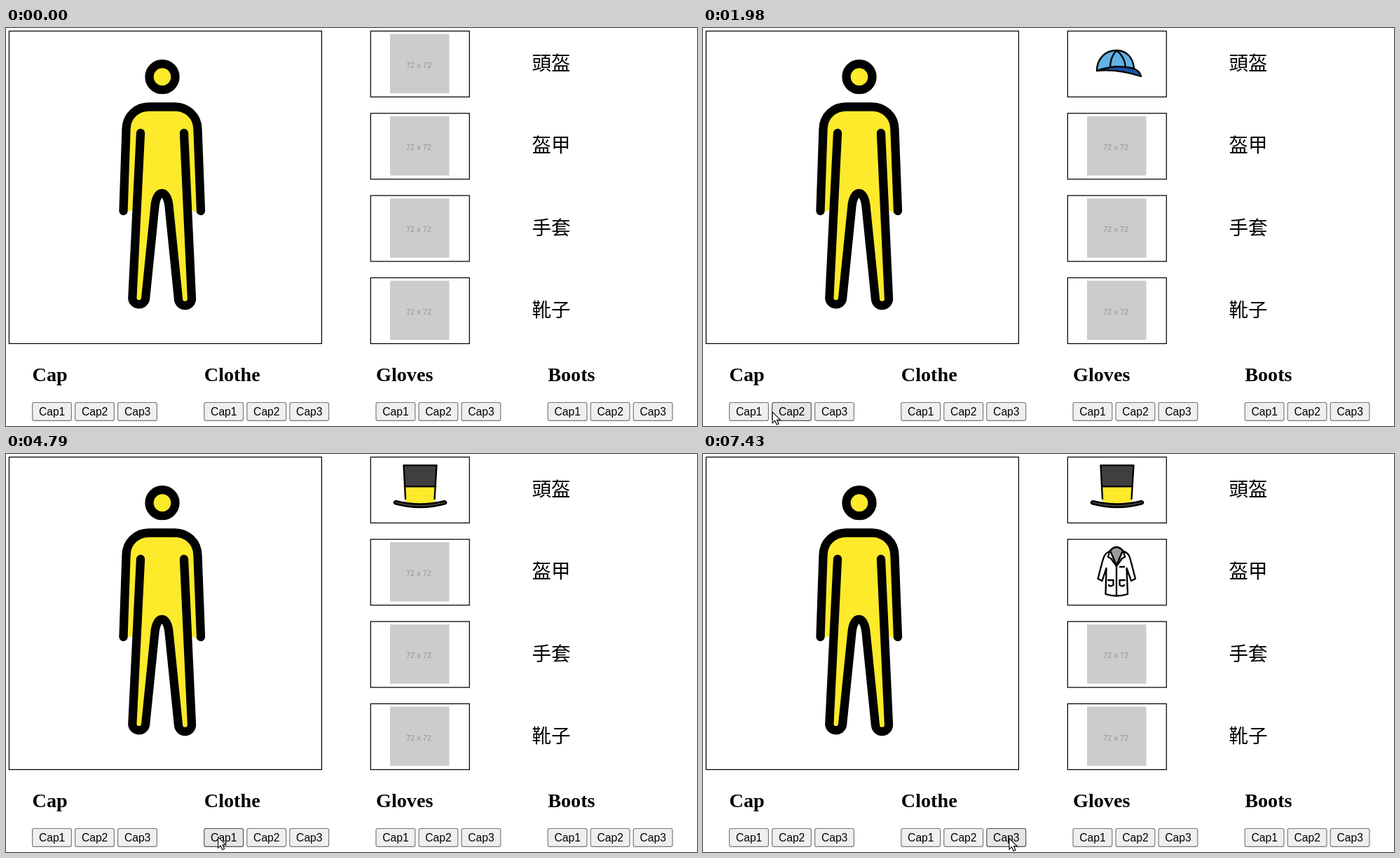
Write an HTML page that moves like this. It is 986 px wide and 568 px high and loops after 8 s.

```html
<!DOCTYPE html>
<html lang="zh-Hant">
<head>
<meta charset="utf-8">
<title>Dress up</title>
<style>
html, body { margin: 0; width: 100%; height: 100%; overflow: hidden; background: #fff; }
svg { display: block; }
.frame { fill: #fff; stroke: #000; stroke-width: 1.25; }
.man { stroke: #000; stroke-width: 12.3; stroke-linecap: round; stroke-linejoin: round; fill: none; }
.item { stroke: #000; stroke-width: 2.35; stroke-linecap: round; stroke-linejoin: round; fill: none; }
.hint { font: 11px "Liberation Sans", Arial, sans-serif; fill: #969696; text-anchor: middle; }
.label { font: 300 27.5px "Noto Sans CJK TC", "Noto Sans CJK", sans-serif; }
.title { font: bold 28.2px "Liberation Serif", Times, serif; }
.btn text { font: 15.67px "Liberation Sans", Arial, sans-serif; text-anchor: middle; }
.btn rect { fill: #efefef; stroke: #767676; stroke-width: 1.15; }
.btn.hover rect { fill: #e5e5e5; stroke: #4f4f4f; }
.btn.active rect { fill: #f5f5f5; stroke: #8d8d8d; }
</style>
</head>
<body>
<svg width="986" height="568" viewBox="0 0 986 568">
  <rect class="frame" x="4.4" y="4.4" width="446" height="446"/>
  <path fill="#fcea2b" d="M170 263L171.5 145C171.5 125 187 112.5 204 112.5H241C258 112.5 273.5 125 273.5 145L277 267L259 256L265 386A9.5 9.5 0 0 1 246 387L232.5 254C230 230 215 230 212.5 254L199 387A9.5 9.5 0 0 1 180.3 386L186 258Z"/>
  <g class="man">
    <circle cx="223" cy="69.7" r="18.5" fill="#fcea2b"/>
    <path d="M167.5 261L171.5 145C171.5 125 187 112.5 204 112.5H241C258 112.5 273.5 125 273.5 145L278 261"/>
    <path d="M192 150L180.3 386A9.5 9.5 0 0 0 199 387L212.5 254C215 230 230 230 232.5 254L246 387A9.5 9.5 0 0 0 265 386L254 150"/>
  </g>
  <g id="ui"></g>

  <g class="item" id="cap">
    <path fill="#61b2e4" d="M562 61C562 44 574 32 590 32C604 32 614 42 615 58Q590 52 562 61Z"/>
    <path fill="#1e50a0" d="M562 61Q590 51 615 58Q624 62 625 69Q592 58 562 61Z"/>
    <path d="M590 32Q581 42 581 56M590 32Q602 41 603 56"/>
  </g>
  <g class="item" id="hat">
    <ellipse cx="590.3" cy="55.5" rx="31.5" ry="7.5" fill="#f1b31c"/>
    <path fill="#f1b31c" stroke="none" d="M575 53C575 39 581 33 590.5 33S606 39 606 53Q590 58 575 53Z"/>
    <path fill="#a57939" stroke="none" d="M594 33Q606 36 606 52L599 54Q601 42 594 33Z"/>
    <path fill="#781e32" d="M575 50Q590 55 606 50V54Q590 58 575 54Z"/>
    <path d="M575 53C575 39 581 33 590.5 33S606 39 606 53"/>
    <path fill="#ea5a47" stroke-width="1.8" d="M601 52L593 49V56ZL610 48.5V56Z"/>
  </g>
  <g class="item" id="tophat">
    <path fill="#fcea2b" stroke="none" d="M569 46H613L612 68Q591 74 570 68Z"/>
    <path fill="#3f3f3f" stroke="none" d="M567 16H615L613 46H569Z"/>
    <path d="M570 64L567.5 16.2H614.5L611.5 64M569 46.3H613"/>
    <path fill="#4b4238" d="M556 67Q591 76 626 67Q630 69 627 71Q609 76 591 76T555 71Q552 69 556 67Z"/>
  </g>
  <g class="item" id="shirt">
    <path fill="#61b2e4" d="M579 140L557.5 151L562 162L572.5 158V191.2H608.5V158L619 162L623.5 151L602 140Q590 129 579 140Z"/>
    <path d="M572.5 158V149M608.5 158V149"/>
    <path fill="#92d3f5" d="M579 140Q590 129 602 140L597 152L590.3 144L584 152ZM581 140Q590 137 599 140"/>
    <path d="M590.3 150v.1M590.3 154.3v.1M590.3 158.6v.1"/>
  </g>
  <g class="item" id="coat">
    <path fill="#fff" d="M580 139C574 141 572 146 570 153L563.5 178L569.5 181L575.5 163L574.5 200Q590 205 606 200L604.5 163L611 181L617 178L610.5 153C609 146 607 141 600 139Q590 127 580 139Z"/>
    <path fill="#9b9b9a" d="M581 138Q590 128 599 138L590 159Z"/>
    <path d="M580 139L578 147L582 149L590 160L598 149L602 147L600 139M590 160V202M595 161H601M578 180H585.5V187Q581 190 579 187M602 180H594.5V187Q599 190 601 187"/>
  </g>

  <circle id="spot" r="14" fill="#faf028" fill-opacity=".65"/>
  <path id="cursor" d="M0 0V15.6L3.6 12.2L6.2 18L9 16.8L6.5 11.2H11.3Z" fill="#fff" stroke="#000" stroke-width="1.1"/>
</svg>
<script>
const $ = id => document.getElementById(id);
const LOOP = 8000;

// Slots, labels and button groups
let html = '';
['頭盔', '盔甲', '手套', '靴子'].forEach((label, i) => {
  const y = i * 117.35;
  html += `<rect class="frame" x="520.3" y="${4.4 + y}" width="141" height="94"/>
    <g id="blank${i}"><rect x="548" y="${8.6 + y}" width="84.5" height="84.5" fill="#ccc"/>
    <text class="hint" x="589" y="${56.5 + y}">72 x 72</text></g>
    <text class="label" x="750.5" y="${60 + y}">${label}</text>`;
});
const buttons = [];
['Cap', 'Clothe', 'Gloves', 'Boots'].forEach((title, i) => {
  const left = 37.6 + i * 245.2;
  html += `<text class="title" x="${left}" y="504">${title}</text>`;
  for (let n = 0; n < 3; n++) {
    const x = left + n * 61;
    buttons.push({ x });
    html += `<g class="btn"><rect x="${x}" y="534.5" width="55.8" height="25.8" rx="2.5"/>
      <text x="${x + 28}" y="552.5">Cap${n + 1}</text></g>`;
  }
});
$('ui').innerHTML = html;
document.querySelectorAll('.btn').forEach((el, i) => buttons[i].el = el);

// Pointer moves: first change, last change, steps, end point, rise on the way
const moves = [
  [330, 830, 7, 61, 549, 0],
  [1710, 2170, 6, 137, 548, 0],
  [3090, 3640, 7, 187, 549, 0],
  [4520, 4880, 5, 316, 547, 0],
  [5800, 6340, 7, 381, 549, 33],
  [6880, 7160, 4, 391, 548, 0],
  [7340, 7430, 2, 437, 549, 0]
];
// Clicks: highlight on, highlight off, item put on, its slot
const clicks = [
  [1360, 1440, 'cap', 0],
  [2530, 2620, 'hat', 0],
  [3990, 4080, 'tophat', 0],
  [5440, 5530, 'shirt', 1],
  [6700, 6790, 'coat', 1]
];
const items = clicks.map(c => c[2]);
const show = (id, on) => $(id).style.display = on ? '' : 'none';

function pointer(t) {
  let x = 140, y = 549;
  for (const [start, end, steps, toX, toY, rise] of moves) {
    if (t < start) break;
    const gap = (end - start) / (steps - 1);
    const p = Math.min(1, (Math.floor((t - start) / gap + 1e-6) + 1) / steps);
    const e = p * p * (3 - 2 * p);
    x += (toX - x) * e;
    y += (toY - y) * e - rise * Math.sin(Math.PI * p);
  }
  return [x, y];
}

function draw(t) {
  const [x, y] = pointer(t), visible = t >= moves[0][0];
  const press = clicks.findIndex(([on, off]) => t >= on && t < off);
  const worn = [];
  for (const [, off, item, slot] of clicks) if (t >= off) worn[slot] = item;
  items.forEach(id => show(id, worn.includes(id)));
  [0, 1].forEach(i => show('blank' + i, !worn[i]));

  for (const b of buttons) {
    const over = visible && x >= b.x && x <= b.x + 56 && y >= 534 && y <= 561;
    b.el.setAttribute('class', 'btn' + (over ? press > 0 ? ' active' : ' hover' : ''));
  }
  show('cursor', visible);
  $('cursor').setAttribute('transform', `translate(${x} ${y - .5})`);
  show('spot', press >= 0);
  $('spot').setAttribute('transform', `translate(${x - .5} ${y - 1.5})`);
}

const origin = performance.now();
function tick() {
  draw((performance.now() - origin) % LOOP);
  requestAnimationFrame(tick);
}
tick();
</script>
</body>
</html>
```
